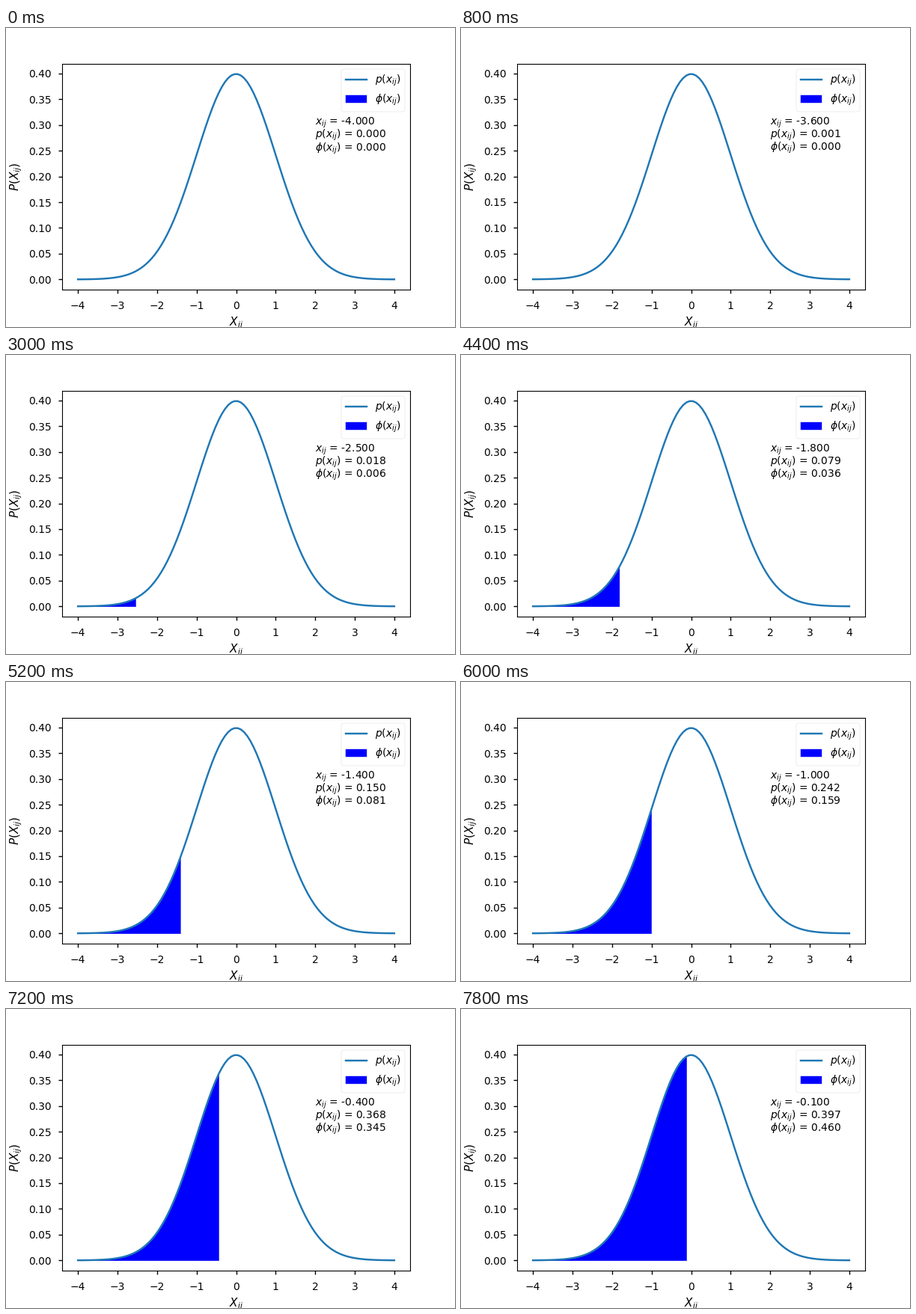
These frames come from a looping animation (600x400 px, 8 s). A matplotlib script:

```python
import math

import matplotlib.pyplot as plt
import numpy as np
from matplotlib.animation import FuncAnimation
from matplotlib.patches import Patch

plt.rcParams.update({
    "font.family": "DejaVu Sans",
    "font.size": 10,
    "axes.labelsize": 11,
    "lines.linewidth": 1.75,
    "patch.linewidth": 0.3,
    "xtick.major.width": 1,
    "ytick.major.width": 1,
    "xtick.major.pad": 7,
    "ytick.major.pad": 7,
})

FRAMES = 40
INTERVAL = 200
START, STEP = -4, 0.1


def pdf(x):
    return np.exp(-x ** 2 / 2) / math.sqrt(2 * math.pi)


def cdf(x):
    return (1 + math.erf(x / math.sqrt(2))) / 2


xs = np.linspace(-4, 4, 100)
ys = pdf(xs)

fig, ax = plt.subplots(figsize=(6, 4), dpi=100)
fig.subplots_adjust(left=0.125, right=0.9, bottom=0.125, top=0.88)
curve, = ax.plot(xs, ys, color="tab:blue", label="$p(x_{ij})$")
ax.set_xlabel("$X_{ij}$")
ax.set_ylabel("$P(X_{ij})$")
ax.set_xlim(-4.4, 4.4)
ax.legend(handles=[curve, Patch(color="blue", label=r"$\phi(x_{ij})$")],
          loc="upper right")

symbols = ["$x_{ij}$", "$p(x_{ij})$", r"$\phi(x_{ij})$"]
readouts = [ax.text(2, 0.3 - 0.025 * k, "") for k in range(3)]
areas = []


def update(i):
    while areas:
        areas.pop().remove()
    x = START + STEP * i
    below = xs < x - 1e-9
    low = ys.min()
    if below.any():
        areas.append(ax.fill_between(xs, ys, where=below, color="blue"))
        low = 0
    # 5 % margin around whatever is drawn
    pad = 0.05 * (ys.max() - low)
    ax.set_ylim(low - pad, ys.max() + pad)
    for text, name, value in zip(readouts, symbols, (x, pdf(x), cdf(x))):
        text.set_text(f"{name} = {value:.3f}")
    return [curve, *areas, *readouts]


anim = FuncAnimation(fig, update, frames=FRAMES, interval=INTERVAL,
                     init_func=lambda: update(0), repeat=True,
                     repeat_delay=0, blit=False)
plt.show()
```
